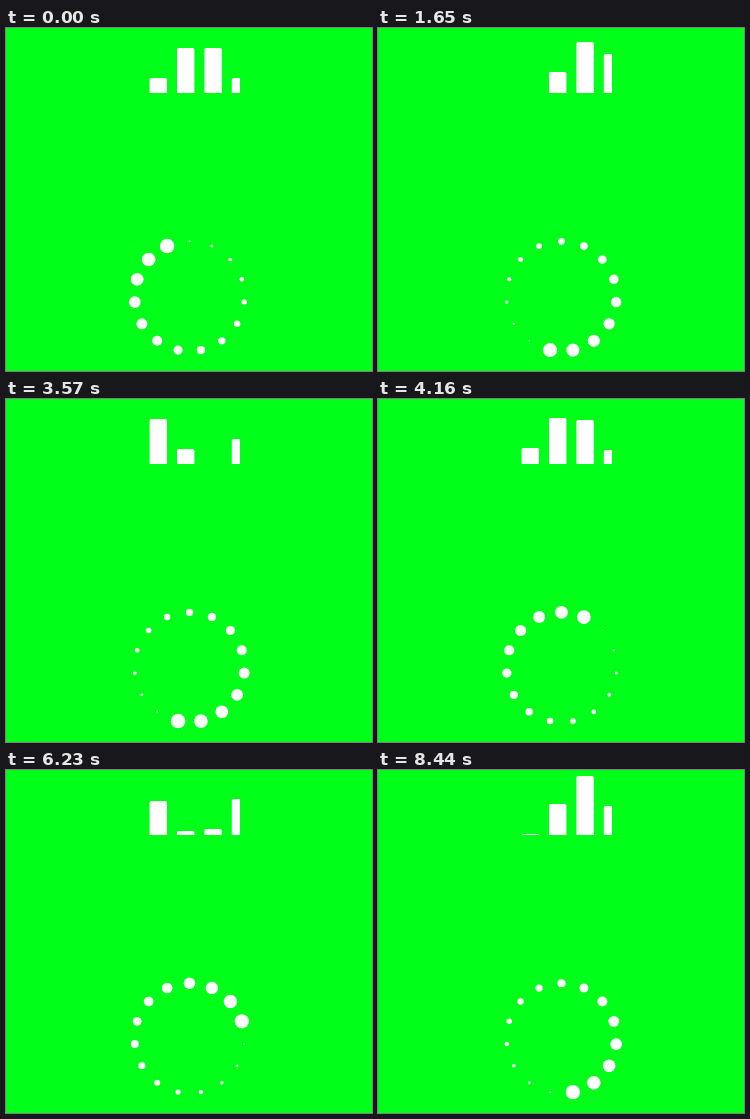
An HTML page with a canvas that plays this animation: 366x343 px, repeating every 8.49 s.

```html
<!DOCTYPE html>
<html lang="en">
<head>
<meta charset="utf-8">
<title>Loaders</title>
<style>
  html, body { margin: 0; height: 100%; overflow: hidden; background: #00ff19; }
  canvas { display: block; }
</style>
</head>
<body>
<canvas id="stage" width="366" height="343"></canvas>
<script>
const ctx = document.getElementById('stage').getContext('2d');
const LOOP = 8490;
const GROUP = 8;        // pictures per group
const STEP = 150;       // animation time per picture
const groupStarts = [0, 1200, 2380, 3570, 4750, 5930, 7110, 8290, 9490];
const mod = (a, n) => ((a % n) + n) % n;

// The picture advances in steps; groups are shown slightly faster than they run.
function steppedTime(t) {
  const g = groupStarts.findLastIndex(start => start <= t);
  const span = groupStarts[g + 1] - groupStarts[g];
  const k = Math.floor((t - groupStarts[g]) / span * GROUP);
  return (g * GROUP + k) * STEP - (k ? 10 : 0);
}

// Each bar rises for 600 ms, falls for 600 ms and rests for 200 ms.
function drawBars(time) {
  ctx.save();
  ctx.beginPath();
  ctx.rect(140, 0, 94, 65);
  ctx.clip();
  ctx.beginPath();
  for (let i = 0; i < 4; i++) {
    const phase = mod(150 + 300 * i - time, 1400);
    const height = Math.max(0, 60 - Math.abs(phase - 600) / 10);
    ctx.roundRect(143.6 + 27.4 * i, 65 - height, 17.4, 64, 1.8);
  }
  ctx.fill();
  ctx.restore();
}

// Dots light up clockwise once a second, then shrink.
function drawRing(time) {
  const count = 15, head = 14 + time * count / 1000;
  for (let i = 0; i < count; i++) {
    const angle = i / count * 2 * Math.PI;
    const age = mod(head - i, count) / count;
    ctx.beginPath();
    ctx.arc(183.5 + 55 * Math.sin(angle), 268.3 - 55 * Math.cos(angle),
            7.25 - 6.75 * age, 0, 2 * Math.PI);
    ctx.fill();
  }
}

function draw() {
  const time = steppedTime(performance.now() % LOOP);
  ctx.fillStyle = '#00ff19';
  ctx.fillRect(0, 0, 366, 343);
  ctx.fillStyle = '#fff';
  drawBars(time);
  drawRing(time);
  requestAnimationFrame(draw);
}
draw();
</script>
</body>
</html>
```
